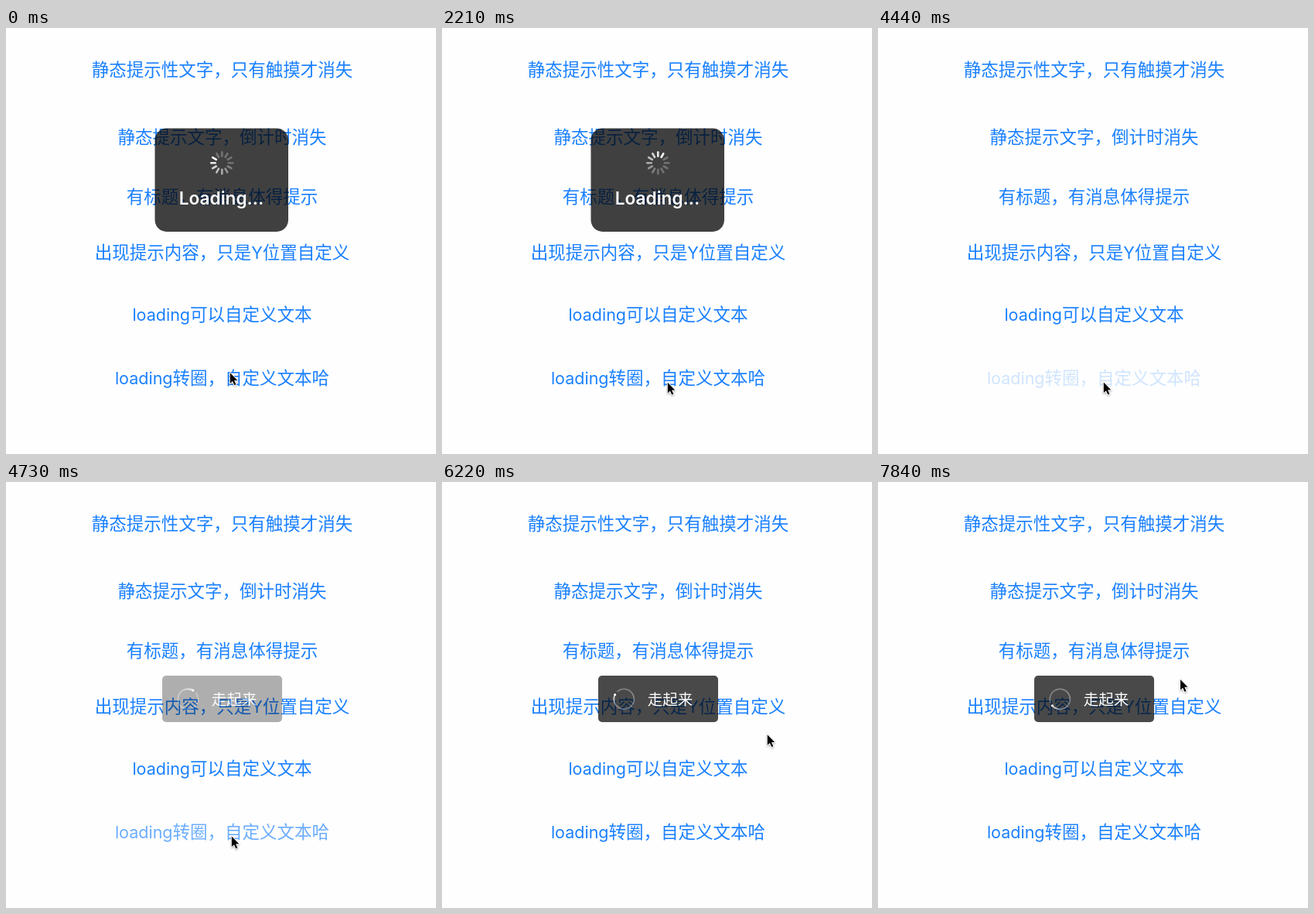
Animation, 556 px wide and 550 px high, one loop 7.99 s. Source, as an HTML page:

```html
<!DOCTYPE html>
<html lang="zh-CN">
<head>
<meta charset="utf-8">
<title>Loading</title>
<style>
  html, body { margin: 0; width: 100%; height: 100%; overflow: hidden; background: #fefefe; }
  svg { display: block; width: 556px; height: 550px; }
  text { font-family: Inter, "Noto Sans CJK SC", "Noto Sans CJK", sans-serif; text-anchor: middle; }
  #buttons { fill: #1a80ff; font-size: 22.5px; }
  #buttons tspan { font-size: 21.5px; }
</style>
</head>
<body>
<svg viewBox="0 0 556 550">
  <g id="buttons">
    <text x="279.5" y="62">静态提示性文字，只有触摸才消失</text>
    <text x="279.5" y="149">静态提示文字，倒计时消失</text>
    <text x="279.5" y="225.5">有标题，有消息体得提示</text>
    <text x="279.5" y="297.5">出现提示内容，只是<tspan>Y</tspan>位置自定义</text>
    <text x="279.5" y="377.5"><tspan>loading</tspan>可以自定义文本</text>
    <text x="279.5" y="460" id="pressed"><tspan>loading</tspan>转圈，自定义文本哈</text>
  </g>
  <g id="hud">
    <rect x="192.5" y="129.5" width="172.5" height="133.5" rx="15" fill-opacity=".75"/>
    <g id="spokes" transform="translate(279.3 174.2)" stroke="#fff" stroke-width="2.6" stroke-linecap="round"/>
    <text x="278.5" y="227.5" fill="#fff" font-size="22.6" font-weight="600">Loading...</text>
  </g>
  <g id="toast">
    <rect x="202" y="250" width="155" height="60" rx="5" fill-opacity=".71"/>
    <g transform="translate(235.3 280.3)"><g id="ring" fill="none" stroke="#fff" stroke-width="1.8"/></g>
    <text x="295" y="287.5" fill="#fff" font-size="19.5" font-weight="500">走起来</text>
  </g>
  <g id="cursor">
    <path id="arrow" d="M0 0V13.6L3.1 10.7 5.5 15.8 7.6 14.9 5.3 9.8H9.5Z" stroke="#fff" stroke-width="1.8" paint-order="stroke" stroke-linejoin="round"
      style="filter: drop-shadow(0 1px 1px rgba(0,0,0,.35))"/>
  </g>
</svg>
<script>
const LOOP = 7990, STEPS = 54, STEP = LOOP / STEPS;
const HUD_END = 26, PRESS = 30, RELEASE = 31;
const $ = id => document.getElementById(id);
const clamp = v => Math.min(1, Math.max(0, v));
const smooth = k => k * k * (3 - 2 * k);

function add(parent, tag, attrs) {
  const el = document.createElementNS('http://www.w3.org/2000/svg', tag);
  for (const key in attrs) el.setAttribute(key, attrs[key]);
  parent.append(el);
  return el;
}

const spokes = Array.from({ length: 12 }, (_, i) =>
  add($('spokes'), 'path', { d: 'M0-8.6V-14', transform: `rotate(${i * 30})` }));

// Ring with a bright head at the top, its tail trailing counterclockwise.
const RADIUS = 13, SEGMENTS = 34;
for (let i = 0; i < SEGMENTS; i++) {
  add($('ring'), 'path', {
    d: `M0 ${-RADIUS}A${RADIUS} ${RADIUS} 0 0 0 -2.26 -12.8`,
    transform: `rotate(${-i * 10})`,
    'stroke-opacity': 0.4 + 0.45 * clamp(1 - i / 6) - 0.1 * i / SEGMENTS
  });
}
add($('ring'), 'circle', { cy: -RADIUS, r: 1.5, fill: '#fff', stroke: 'none' });

// Resting points of the pointer; it eases from one to the next.
const stops = [
  { at: 0, x: 289.8, y: 445.3 },
  { at: 2, x: 291.8, y: 458 },
  { at: 32, x: 291.8, y: 457.5 },
  { at: 36, x: 413.5, y: 380.5 },
  { at: 37, x: 439, y: 364 },
  { at: 47, x: 402.5, y: 288.5 },
  { at: 53, x: 391, y: 255 }
];

function pointer(step) {
  const i = Math.max(1, stops.findIndex(stop => stop.at >= step));
  const a = stops[i - 1], b = stops[i];
  const k = smooth((step - a.at) / (b.at - a.at));
  return [a.x + (b.x - a.x) * k, a.y + (b.y - a.y) * k];
}

function draw(now) {
  // Steps fall on slightly rounded times, hence the small lead.
  const step = Math.min(STEPS - 1, Math.floor((now % LOOP + 14) / STEP));
  const time = step * STEP;

  $('hud').style.display = step < HUD_END ? '' : 'none';
  const head = Math.floor(time * 12 / 1000 + 10.5) % 12;
  spokes.forEach((spoke, i) => {
    const lag = (head - i + 12) % 12;
    spoke.setAttribute('stroke-opacity', Math.max(0.27, 1 - lag * 0.11));
  });

  const fade = clamp((step - RELEASE) / 1.8);
  $('toast').setAttribute('opacity', clamp((step - RELEASE - 0.2) / 1.8));
  $('pressed').setAttribute('opacity', step < PRESS ? 1 : 0.2 + 0.8 * fade);
  $('ring').setAttribute('transform', `rotate(${time * 0.18 + 258})`);
  $('cursor').setAttribute('transform', `translate(${pointer(step)})`);
}

const start = performance.now();
function tick() {
  draw(performance.now() - start);
  requestAnimationFrame(tick);
}
tick();
</script>
</body>
</html>
```
